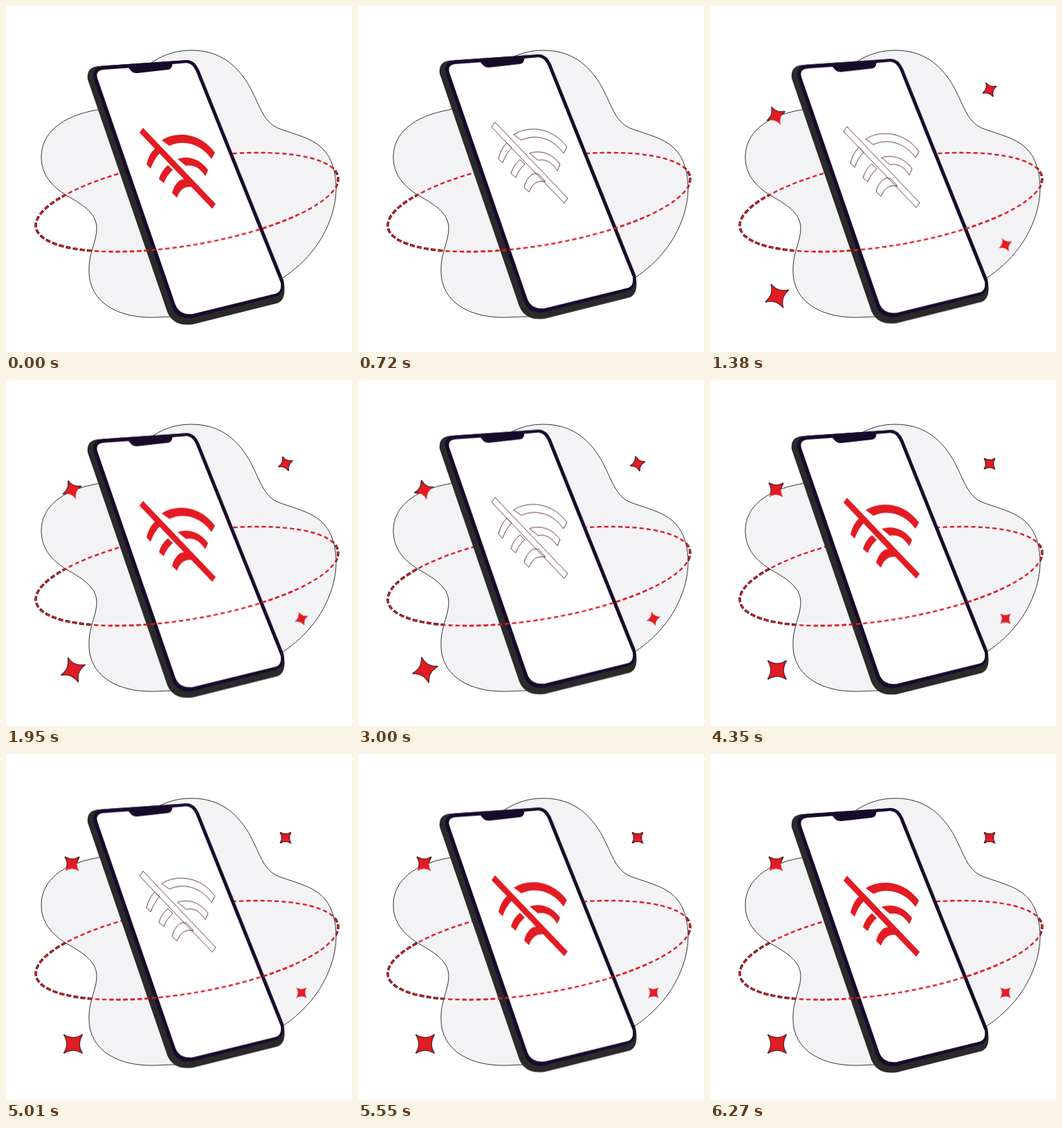
An HTML page that plays this animation: 500x500 px, repeating every 6.33 s.

```html
<!DOCTYPE html>
<html lang="en">
<head>
<meta charset="utf-8">
<title>No connection</title>
<style>
  html, body { margin: 0; width: 100%; height: 100%; overflow: hidden; background: #fff; }
  svg { display: block; width: 100%; height: 100%; }
  .orbit { fill: none; stroke: #e31b23; stroke-width: 2.4; stroke-dasharray: 6 4; }
  .orbit.edge { stroke: #000; stroke-width: 3.4; stroke-dasharray: 6.8 3.2; }
  .star { fill: #e31b23; }
  .star.edge { fill: #000; stroke: #000; stroke-width: 1.4; vector-effect: non-scaling-stroke; }
  #line { fill: none; stroke: #3a0810; stroke-width: .8; }
</style>
</head>
<body>
<svg viewBox="0 0 500 500">
  <defs>
    <clipPath id="front"><rect x="150" y="270" width="270" height="110"/></clipPath>
    <ellipse id="ring" rx="221.3" ry="62.4" pathLength="940" transform="translate(261.5 283.5) rotate(-9.5)"/>
    <path id="wifi" d="M193 183L198 176L303 286L298 293Z
      M225 194C245 181 280 182 302 212L297 221C282 200 258 192 236 202Z
      M215 206L222 213Q214 221 209 235L203 229Q206 215 215 206Z
      M248 221C262 216 280 220 292 237L288 246C280 234 272 229 260 231Z
      M234 230L241 237Q232 245 228 256L221 250Q225 237 234 230Z
      M251 252Q256 249 261 251L271 262Q254 258 247 277L240 270Q243 258 251 252Z"/>
  </defs>

  <!-- dark rims show only outside the blob -->
  <use href="#ring" class="orbit edge"/>
  <g id="rims"></g>

  <path fill="#f3f3f6" stroke="#000" stroke-width=".8" d="M268 64C316 64 341 94 356 124C370 152 374 170 397 178
    C428 189 457 194 470 225C478 245 479 268 474 290C463 337 434 370 400 393C350 427 300 447 245 449
    C230 449 220 450 210 450C160 450 127 428 121 395C116 362 130 345 131 323C132 300 112 288 88 274
    C66 261 51 243 51 218C51 184 80 159 132 150C165 140 190 95 213 80C230 69 248 64 268 64Z"/>
  <use href="#ring" class="orbit"/>

  <g id="phone">
    <path fill="#2a2a2a" d="M118 106Q116 89 132 87L262 78Q272 78 279 92L401 396Q407 426 390 430L270 460Q242 464 233 442Z"/>
    <path fill="#190a2c" d="M127 106Q123 89 140 86.500L258 78.500Q271 77 278 92L401 398Q404 415 390 420L268 451Q248 453 241 437Z"/>
    <path fill="#fff" d="M132 104Q129 93 141 92L177 89.500L181 94Q184 97.500 190 97L234 92Q240 91 240.500 84
      L258 82.500Q268 81 274 93L397 400Q399 414 388 416L270 445Q251 447 245 432Z"/>
    <use id="line" href="#wifi"/>
    <use id="icon" href="#wifi" fill="#e31b23"/>
  </g>

  <use href="#ring" class="orbit" clip-path="url(#front)"/>
  <g id="stars"></g>
</svg>
<script>
  const LOOP = 6330;
  const SINE = 'cubic-bezier(.37,0,.63,1)';
  const $ = id => document.getElementById(id);

  // steps: [ms, value, easing to the next step]
  function play(el, prop, steps) {
    const frames = steps.map(([ms, value, easing = 'linear']) =>
      ({ offset: ms / LOOP, [prop]: value, easing }));
    el.animate(frames, { duration: LOOP, iterations: Infinity });
  }

  const lift = y => `translate(0px, ${y}px)`;
  play($('phone'), 'transform', [
    [0, lift(0), SINE], [700, lift(-8.2), SINE], [1680, lift(0), SINE],
    [2685, lift(-8.2), SINE], [3690, lift(0), SINE], [4720, lift(-8.2), SINE],
    [5750, lift(0)], [LOOP, lift(0)]
  ]);

  // hard blink: one second on, one second off
  const blink = [[0, 1]];
  for (let ms = 500, on = 1; ms < 6000; ms += 1000) {
    blink.push([ms, on], [ms, on = 1 - on]);
  }
  blink.push([LOOP, 1]);
  play($('icon'), 'opacity', blink);
  play($('line'), 'opacity', blink.map(([ms, on]) => [ms, 1 - on]));

  for (const ring of document.querySelectorAll('.orbit')) {
    play(ring, 'strokeDashoffset', [[0, 0], [LOOP, -100]]);
  }

  const STAR = 'M0-1Q.17-.17 1 0Q.17.17 0 1Q-.17.17-1 0Q-.17-.17 0-1Z';
  const STARS = [[97, 419, 19], [95.5, 159, 14.5], [404, 121, 11], [427, 345, 11]];
  const turn = deg => `rotate(${deg}deg)`;

  function addStar(parent, [x, y, r], cls) {
    const make = tag => document.createElementNS('http://www.w3.org/2000/svg', tag);
    const g = make('g'), path = make('path');
    g.setAttribute('transform', `translate(${x} ${y}) scale(${r})`);
    path.setAttribute('d', STAR);
    path.setAttribute('class', cls);
    g.append(path);
    parent.append(g);
    play(path, 'transform', [[0, turn(135)], [250, turn(135), 'ease'], [4450, turn(-225)], [LOOP, turn(-225)]]);
    play(path, 'opacity', [[0, 0], [1000, 0], [1000, 1], [LOOP, 1]]);
  }
  for (const star of STARS) {
    addStar($('rims'), star, 'star edge');
    addStar($('stars'), star, 'star');
  }
</script>
</body>
</html>
```
